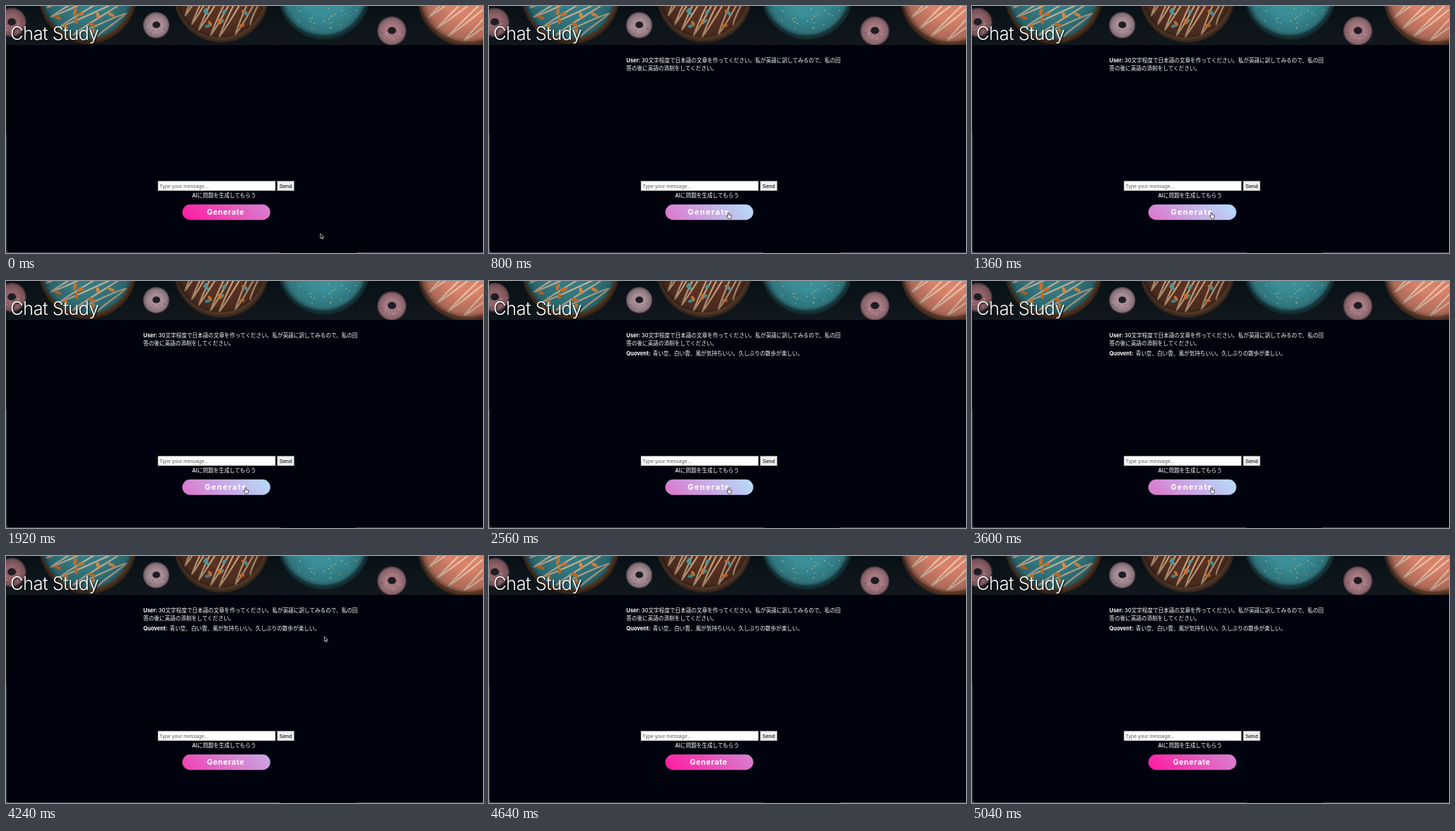
These frames come from a looping animation (660 px wide and 342 px high, 5.12 s). An HTML page:

```html
<!DOCTYPE html>
<html lang="ja">
<head>
<meta charset="utf-8">
<title>Chat Study</title>
<style>
  html, body { margin: 0; width: 100%; height: 100%; overflow: hidden; background: #00030d; }
  svg { display: block; width: 660px; height: 342px; }
  text { font: 500 7.43px Inter, "Noto Sans CJK JP", sans-serif; fill: #fff; white-space: pre; }
  .bold { font-weight: 700; }
  #title { font-size: 25px; font-weight: 300; letter-spacing: -.6px; text-shadow: 1px 1px 2px #000; }
  .field { font-family: "Liberation Sans", Arial, sans-serif; }
  #label { font-size: 10.6px; font-weight: 700; }
</style>
</head>
<body>
<svg viewBox="0 0 660 342">
  <defs>
    <clipPath id="photoClip"><rect width="660" height="54"/></clipPath>
    <linearGradient id="table" x2="0" y2="1">
      <stop stop-color="#081117"/><stop offset="1" stop-color="#11181d"/>
    </linearGradient>
    <radialGradient id="shade">
      <stop offset=".45" stop-color="#04090d" stop-opacity="0"/>
      <stop offset=".82" stop-color="#04090d" stop-opacity=".2"/>
      <stop offset="1" stop-color="#04090d" stop-opacity=".75"/>
    </radialGradient>
    <linearGradient id="pill" gradientUnits="userSpaceOnUse">
      <stop stop-color="#ff18a0"/><stop offset="1" stop-color="#b5dffc"/>
    </linearGradient>
  </defs>

  <rect width="660" height="342" fill="#3b4048"/>
  <path d="M380 341h105v1h-105z" fill="#08090c"/>
  <path d="M0 54h1v124h-1z" fill="#17130f"/>
  <path d="M1 0H660V341H5Q1 341 1 337Z" fill="#00030d"/>

  <g id="photo" clip-path="url(#photoClip)">
    <rect width="660" height="54" fill="url(#table)"/>
  </g>
  <text id="title" x="6" y="46.5">Chat Study</text>

  <g id="question">
    <text y="78"><tspan class="bold" x="190">User:</tspan><tspan x="211">30文字程度で日本語の文章を作ってください。私が英語に訳してみるので、私の回</tspan></text>
    <text x="190" y="89">答の後に英語の添削をしてください。</text>
  </g>
  <text id="answer" y="103"><tspan class="bold" x="190">Quovent:</tspan><tspan x="226.5">青い空、白い雲、風が気持ちいい。久しぶりの散歩が楽しい。</tspan></text>

  <rect x="210.2" y="242.4" width="162.6" height="13.4" fill="#fff" stroke="#888" stroke-width=".5"/>
  <text class="field" x="212.5" y="252" style="font-size:7.1px;fill:#606060">Type your message...</text>
  <rect x="375.3" y="242.4" width="23.4" height="13.4" fill="#efefef" stroke="#888" stroke-width=".5"/>
  <text class="field" x="378.2" y="252" style="font-size:7.5px;fill:#000">Send</text>
  <text x="257.5" y="264.5">AIに問題を生成してもらう</text>

  <rect x="244" y="274.8" width="121.7" height="21.4" rx="10.7" fill="url(#pill)"/>
  <text id="label" y="289.4">Generate</text>

  <g id="cursor" stroke-linejoin="round">
    <path id="arrow" d="M0 0V6.8L1.6 5.4L2.7 7.8L3.8 7.3L2.8 5H5Z" fill="#08090c" stroke="#e4e4e8" stroke-width=".7"/>
    <path id="hand" d="M-.8 .3Q0 -.6 .8 .3V3L4 3.8V6L3 8.3H-.4L-2.4 5.2L-1.8 4.4L-.8 5.1Z" fill="#fff" stroke="#111" stroke-width=".7"/>
  </g>
</svg>
<script>
const LOOP = 5120, ENTER = 275, LEAVE = 4070, FADE = 500;
const $ = id => document.getElementById(id);
const clamp = v => Math.min(1, Math.max(0, v));
const smooth = p => p * p * (3 - 2 * p);
const easeOut = p => 1 - (1 - p) ** 2;

let seed = 7;
const random = () => (seed = seed * 16807 % 2147483647) / 2147483647;

function add(parent, tag, attrs) {
  const node = document.createElementNS('http://www.w3.org/2000/svg', tag);
  for (const key in attrs) node.setAttribute(key, attrs[key]);
  return parent.appendChild(node);
}

// toppings are painted between the icing and the edge shading
function donut(cx, cy, r, dough, icing, toppings) {
  const g = add($('photo'), 'g', { transform: `translate(${cx} ${cy})` });
  add(g, 'circle', { r, fill: dough });
  add(g, 'circle', { cx: -r * .02, cy: -r * .05, r: r * .94, fill: icing });
  toppings(g);
  add(g, 'circle', { r: r + .5, fill: 'url(#shade)' });
}

function drizzle(g, r, color, angle, count) {
  let d = '', lastX, lastY;
  for (let i = 0; i <= count; i++) {
    const x = (i / count * 2 - 1) * r * .84 + (random() - .5) * 5;
    const y = Math.sqrt(Math.max(0, r * r * .76 - x * x)) * (i % 2 ? 1 : -1);
    d += i ? `C${lastX + 5} ${lastY * .4} ${x - 5} ${y * .4} ${x} ${y}` : `M${x} ${y}`;
    [lastX, lastY] = [x, y];
  }
  add(g, 'path', { d, fill: 'none', stroke: color, 'stroke-width': 2.2,
    'stroke-linejoin': 'round', transform: `rotate(${angle})` });
}

function sprinkle(g, r, count, colors, rx, ry) {
  for (let i = 0; i < count; i++) {
    const a = random() * Math.PI, d = r * (.3 + .55 * random());
    const x = d * Math.cos(a), y = d * Math.sin(a);
    add(g, 'ellipse', { rx, ry, fill: colors[i % colors.length],
      transform: `translate(${x} ${y}) rotate(${random() * 180})` });
  }
}

function smallDonut(cx, cy, r, icing) {
  donut(cx, cy, r, '#5b434b', icing, g => {
    sprinkle(g, r, 16, ['#c3a3a8', '#806570'], 1, .7);
    add(g, 'ellipse', { cy: -1, rx: r * .28, ry: r * .24, fill: '#1d1d23' });
  });
}

smallDonut(8, 23, 21, '#8f6268');
donut(113, -15, 68, '#8f5830', '#347a82', g => {
  drizzle(g, 68, '#bfae94', 62, 13);
  sprinkle(g, 66, 11, ['#c96f2b', '#d98a40'], 5, 2.3);
});
smallDonut(208, 27, 19, '#a78c95');
donut(298, -15, 66, '#8f5c3a', '#5a3223', g => {
  drizzle(g, 66, '#c4a07c', 28, 15);
  sprinkle(g, 60, 12, ['#d9772f', '#4d949a'], 4, 2.2);
});
donut(440, -17, 64, '#2c646b', '#3a8f98', g => {
  sprinkle(g, 62, 36, ['#a9c9b6', '#c6b788'], 1, .8);
});
smallDonut(534, 35, 21, '#a67880');
donut(640, -14, 71, '#a8653e', '#d9826a', g => drizzle(g, 71, '#e6c3aa', 50, 13));

// time, x, y of the pointer tip
const path = [[80, 435, 315], [400, 331.5, 286], [4040, 331.5, 286], [4240, 440.5, 111.5], [4600, 475, -14]];

function pointerAt(t) {
  let [, x, y] = path[0];
  for (let i = 1; i < path.length; i++) {
    const [t0, x0, y0] = path[i - 1], [t1, x1, y1] = path[i];
    if (t < t0) break;
    const p = smooth(clamp((t - t0) / (t1 - t0)));
    x = x0 + (x1 - x0) * p;
    y = y0 + (y1 - y0) * p;
  }
  return [x, y];
}

const show = (id, on) => $(id).setAttribute('visibility', on ? 'visible' : 'hidden');

function draw(now) {
  const t = now % LOOP;
  const hover = t >= ENTER && t < LEAVE;
  const shift = easeOut(clamp((t - ENTER) / FADE)) - easeOut(clamp((t - LEAVE) / FADE));

  show('question', t >= 640);
  show('answer', t >= 2240);
  show('arrow', !hover);
  show('hand', hover);
  $('cursor').setAttribute('transform', `translate(${pointerAt(t)})`);

  // a 45deg gradient twice as wide as the button slides left on hover
  const mid = 365.5 - 121.5 * shift;
  const ends = { x1: mid - 66, y1: 351.5, x2: mid + 66, y2: 219.5 };
  for (const key in ends) $('pill').setAttribute(key, ends[key]);

  $('label').setAttribute('x', hover ? 275 : 278);
  $('label').style.letterSpacing = hover ? '1.4px' : '.55px';
  requestAnimationFrame(draw);
}
requestAnimationFrame(draw);
</script>
</body>
</html>
```
